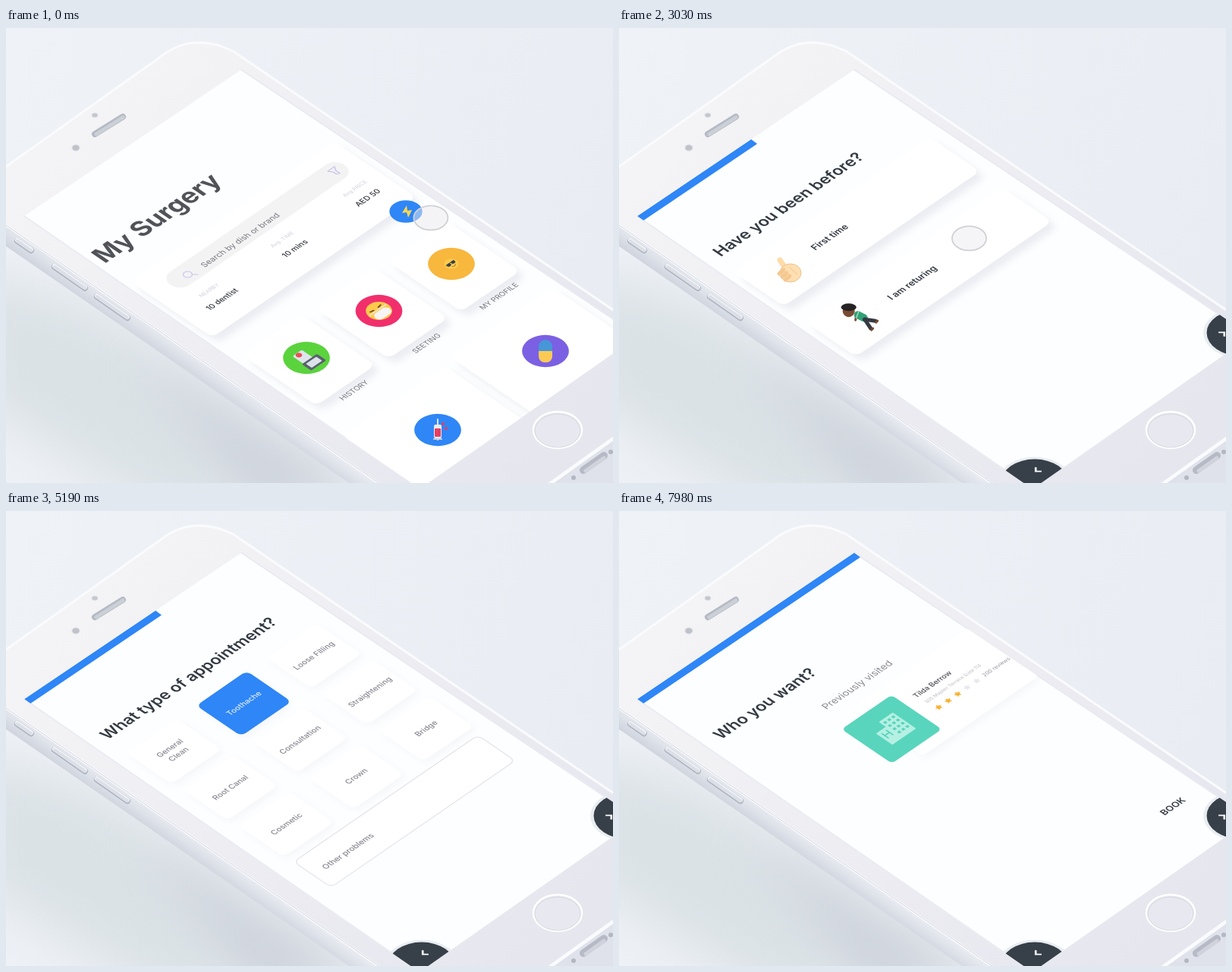
An HTML page with a canvas that plays this animation: 800x600 px, repeating every 8000 ms.

```html
<!DOCTYPE html>
<html lang="en">
<head>
<meta charset="utf-8">
<title>Dental booking</title>
<style>
html, body { margin: 0; width: 100%; height: 100%; overflow: hidden; background: #eceff5; }
canvas { display: block; width: 800px; height: 600px; }
</style>
</head>
<body>
<canvas id="stage" width="800" height="600"></canvas>
<script>
const LOOP = 8000, BLUE = '#2f86f6', INK = '#343a43', GRAY = '#85858f', GLASS = '#3b4048';
// Screen axes of the tilted phone: u runs up-right, v runs down-right.
const UX = .763, UY = -.525, VX = .77, VY = .525;
const SCREEN = [[24, 248], [310, 55], [833, 406], [545, 608]];
// Start of each page after the home page, and the progress bar it leads to
const STARTS = [500, 1900, 3400, 5200, 7320];
const PROGRESS = [0, .273, .525, .605, .735, 1];

const backdrop = new OffscreenCanvas(800, 600);
const main = document.getElementById('stage').getContext('2d');
let g = backdrop.getContext('2d'), shift = 0;

const clamp = x => Math.max(0, Math.min(1, x));
const ease = x => (x = clamp(x)) * x * (3 - 2 * x);
const along = (x, y, u, v) => [x + u * UX + v * VX, y + u * UY + v * VY];
const tilt = (x, y) => g.setTransform(UX, UY, VX, VY, ...along(x, y, shift, 0));
const flat = (x = 0, y = 0) => g.setTransform(1, 0, 0, 1, ...along(x, y, shift, 0));

function paint(fill, stroke, width = 1) {
  if (fill) { g.fillStyle = fill; g.fill(); }
  if (stroke) { g.strokeStyle = stroke; g.lineWidth = width; g.stroke(); }
}
function poly(points, fill, stroke, width) {
  g.beginPath();
  points.forEach(p => g.lineTo(...p));
  if (fill) g.closePath();
  paint(fill, stroke, width);
}
function oval(x, y, rx, ry, ...style) {
  g.beginPath();
  g.ellipse(x, y, rx, ry, 0, 0, 7);
  paint(...style);
}
const dot = (x, y, r, ...style) => oval(x, y, r, r, ...style);
function box(x, y, w, h, r, ...style) {
  g.beginPath();
  g.roundRect(x, y, w, h, r);
  paint(...style);
}
function line(x1, y1, x2, y2, color, width) {
  g.lineCap = 'round';
  poly([[x1, y1], [x2, y2]], null, color, width);
  g.lineCap = 'butt';
}
function text(str, x, y, size, color = GRAY, weight = 400, align = 'center') {
  tilt(x, y);
  g.font = `${weight} ${size}px Inter, sans-serif`;
  g.fillStyle = color;
  g.textAlign = align;
  g.textBaseline = align === 'center' ? 'middle' : 'alphabetic';
  g.fillText(str, 0, 0);
}
const title = str => text(str, 134, 302, 22.4, INK, 600, 'left');

// A raised card hung from its lower left corner.
function card(x, y, w, h, r = 10, depth = 1) {
  tilt(x, y);
  g.shadowColor = `rgba(115,115,150,${.12 * depth})`;
  g.shadowBlur = 10;
  g.shadowOffsetX = 8 * depth;
  g.shadowOffsetY = 7 * depth;
  box(0, -h, w, h, r, '#fff');
  g.shadowColor = 'transparent';
}

function drawBackdrop() {
  flat();
  let grad = g.createLinearGradient(0, 0, 800, 300);
  grad.addColorStop(0, '#eff2f7');
  grad.addColorStop(1, '#e9ecf2');
  g.fillStyle = grad;
  g.fillRect(0, 0, 800, 600);

  g.filter = 'blur(28px)';
  poly([[-40, 320], [120, 370], [470, 610], [200, 640], [-40, 490]], '#dbe2e6');
  poly([[170, 430], [470, 620], [330, 630]], '#ced3dc');
  g.filter = 'none';

  // Metal side, lit at its upper rim
  grad = g.createLinearGradient(24, 268, 7, 292);
  grad.addColorStop(0, '#eceef3');
  grad.addColorStop(.5, '#dee2e9');
  grad.addColorStop(1, '#cfd4de');
  poly([[-20, 225], [-20, 274], [455, 602], [800, 700], [800, 400]], grad);

  // Front face
  g.beginPath();
  g.moveTo(-20, 197);
  g.lineTo(205, 37);
  g.quadraticCurveTo(247, 5, 300, 31);
  g.lineTo(840, 399);
  g.lineTo(840, 512);
  g.lineTo(640, 655);
  g.lineTo(570, 655);
  g.lineTo(-20, 246);
  grad = g.createLinearGradient(150, 60, 720, 560);
  grad.addColorStop(0, '#f4f3f5');
  grad.addColorStop(1, '#e6e6ef');
  paint(grad, '#fafbfd', 3);
  line(-20, 246, 500, 606, '#d0d4de', 1);
  poly([[840, 513], [640, 656], [840, 656]], '#dfe2ea');
  line(840, 514, 640, 657, '#fafbfd', 3);
  line(761, 583, 788, 564, '#b6bac5', 10);
  line(764, 584, 788, 567, '#d0d3dc', 5);
  [[748, 593], [797, 559]].forEach(([x, y]) => dot(x, y, 3, '#b2b7c2'));

  for (const [x, half] of [[24, 9], [84, 20], [140, 20]]) {
    const y = 287 + .7 * (x - 24);
    const strip = (lift, color, width) =>
      line(x - half, y - .7 * half - lift, x + half, y + .7 * half - lift, color, width);
    strip(0, '#aeb5c3', 8);
    strip(1, '#f1f3f6', 6);
    strip(0, '#dcdfe6', 4);
  }
  oval(92, 158, 5, 4, '#bfc2ca', '#dcdde3');
  oval(117, 115, 4, 3, '#c3c6ce', '#dfe0e5');
  line(117, 140, 154, 117, '#b4bac4', 8);
  line(119, 140, 154, 118, '#cbd0d7', 5);
  oval(727, 530, 32, 24, '#e8e8f0', '#fff', 2.5);
  oval(727, 531, 30, 22, null, '#d6d7e0', 1);

  poly(SCREEN, '#fdfeff');
  line(...SCREEN[1], ...SCREEN[2], '#e9eaf2', 2);
  line(...SCREEN[0], ...SCREEN[3], '#ebecf3', 2);
}

function shades(x, y, r) {
  tilt(x, y);
  dot(0, 0, r, '#fdcb4c');
  g.scale(r / 15, r / 15);
  for (const side of [-1, 1]) box(side * 6 - 5, -5, 10, 8, 4, GLASS);
  line(-11, -4, 11, -4, GLASS, 2);
  g.beginPath();
  g.arc(0, 3, 6, .4, 2.5);
  paint(null, '#a8672a', 1.5);
}
function girl(x, y, r, child) {
  tilt(x, y);
  const hair = '#f9b52d';
  dot(0, 0, r, hair);
  if (!child) box(-r, 0, 2 * r, r + 1, 3, hair);
  oval(0, 3, r * .68, r * .75, '#ffdc8c');
  oval(-2, -r * .5, r * .7, r * .38, hair);
  for (const side of [-1, 1]) {
    if (child) dot(side * r, 7, 4, '#f5a02c');
    dot(side * 4.5, 2, 1.6, '#4b3b2c');
  }
  line(-3, 9, 3, 9, '#d8574f', 2);
}
function mask(x, y) {
  tilt(x, y);
  dot(0, 0, 16, '#fdca4c');
  box(-12, 0, 24, 13, 6, '#f7f5f5');
  line(-14, -2, 14, -2, '#eee', 1.5);
  for (const side of [-1, 1]) line(side * 9, -6, side * 4, -5, '#704b20', 2);
}
function hand(x, y) {
  flat(x, y);
  line(2, 6, -11, -13, '#ffdba8', 7);
  oval(3, 4, 14, 12, '#ffdfb2', '#eebf87', 1);
  for (let i = 0; i < 3; i++) line(4 * i - 12, 4 * i + 5, 4 * i - 6, 4 * i, '#f5c891', 5);
  line(1, -4, 12, 6, '#f3c58e', 1);
}
function walker(x, y) {
  flat(x, y);
  line(-3, -3, -4, 5, '#7a4b32', 3);
  line(-1, -2, 7, 2, '#31a176', 10);
  line(0, -6, -3, 2, '#a6d7c0', 1.5);
  for (const [fx, fy] of [[22, 6], [16, 16]]) {
    line(8, 4, fx, fy, '#353941', 5);
    line(fx + 1, fy + 2, fx + 3, fy, '#7a4b32', 3);
  }
  dot(-13, -7, 8, '#7a4b32');
  oval(-13, -12, 10, 5, '#252323');
}

function disc(x, y, color, r = 28.5) {
  tilt(x, y);
  dot(0, 0, r, color);
}
function clipboard(x, y) {
  tilt(x, y);
  box(-10, -14, 16, 24, 2, '#dfe5ec');
  box(-12, 4, 26, 16, 2, '#59616b');
  box(-8, 7, 18, 10, 1, '#dce2e9');
  dot(-3, -10, 4, '#ea4f55');
}
function pill(x, y) {
  flat(x, y);
  box(-9, -15, 18, 15, [9, 9, 0, 0], '#4796d8');
  box(-9, 0, 18, 15, [0, 0, 8, 8], '#fbca55');
}
function syringe(x, y) {
  flat(x, y);
  line(0, -14, 0, 13, '#dfe4ee', 2);
  box(-5, -7, 10, 18, 2, '#e9edf4');
  box(-4, -2, 8, 11, 1, '#e83d61');
  line(-5, 12, 5, 12, '#c9d1df', 2);
  for (const i of [0, 1]) dot(7 + 4 * i, -8 + 6 * i, 2, '#e83d61');
}

function home() {
  text('My Surgery', 130, 311, 36, '#505358', 700, 'left');
  card(272, 408, 352, 140);
  tilt(230, 330);
  box(-17, -17, 301, 33, 17, '#f4f3f4');
  tilt(241, 325);
  dot(-1, -1, 5.5, null, '#cbc8ea', 1.3);
  line(3, 3, 8, 8, '#cbc8ea', 1.3);
  tilt(433, 189);
  poly([[-6, -6], [6, -6], [2, 0], [2, 7], [-2, 5], [-2, 0], [-6, -6]], null, '#c4c0ea', 1.3);
  text('Search by dish or brand', 309, 280, 11.6, '#77777e');
  [['NEARBY', '10 dentist'], ['Avg. TIME', '10 mins'], ['Avg.PRICE', 'AED 50']].forEach(([label, value], i) => {
    const x = 268 + 96 * i, y = 346 - 67 * i;
    text(label, x, y, 7.8, '#cfcfdb');
    text(value, x + 17, y + 12, 11, '#33363d', 500);
  });
  disc(527, 242, BLUE, 20);
  flat(528, 242);
  poly([[0, -8], [-6, 2], [0, 1], [2, 8], [7, -2], [1, -1]], '#ffd84d');

  const tiles = [['HISTORY', '#5bd33d', clipboard], ['SEETING', '#f12f6d', mask],
    ['MY PROFILE', '#f8b73d', (x, y) => shades(x, y, 9)]];
  tiles.forEach(([label, color, icon], i) => {
    const x = 396 + 95.5 * i, y = 435 - 62 * i;
    card(x + 13, y + 63, 102, 127);
    disc(x, y, color);
    icon(x, y);
    text(label, x + 63, y + 43, 10.5, '#74757d');
  });
  [[BLUE, syringe], ['#7b60e3', pill]].forEach(([color, icon], i) => {
    const x = 569 + 142 * i, y = 530 - 104 * i;
    card(x - 14, y + 84, 176, 145);
    disc(x, y, color);
    icon(x, y);
  });
}

// Each part of a page springs sideways into its place, later parts with a delay.
function part(time, page, delay, draw) {
  const start = page ? STARTS[page - 1] : -LOOP, end = (STARTS[page] ?? LOOP) + 200;
  const t = (time - start) / 1000 - delay * .14;
  const alpha = clamp(t / .25) * clamp((end - time) / 200);
  if (!alpha) return;
  g.globalAlpha = alpha;
  shift = -160 * Math.exp(-5 * t) * Math.cos(7 * t);
  draw();
  shift = 0;
  g.globalAlpha = 1;
}

function choices(time, page, heading, items) {
  part(time, page, 0, () => title(heading));
  items.forEach(([label, x, y, icon], i) => part(time, page, i / 2, () => {
    card(217 + 95.5 * i, 367 + 66 * i, 339, 86);
    icon();
    text(label, x, y, 13, INK, 600);
  }));
}

const PROBLEMS = [
  ['General|Clean', 'Toothache', 'Loose Filling'],
  ['Root Canal', 'Consultation', 'Straightening'],
  ['Cosmetic', 'Crown', 'Bridge']];

function problems(time) {
  part(time, 3, 0, () => title('What type of appointment?'));
  PROBLEMS.forEach((row, r) => part(time, 3, r, () => row.forEach((label, c) => {
    const x = 222 + 74 * r + 92 * c, y = 317 + 48 * r - 63 * c;
    card(x - 4, y + 43, 87, 77, 8, .5);
    const picked = label === 'Toothache' && time > 4950;
    if (picked) box(0, -77, 87, 77, 8, BLUE);
    label.split('|').forEach((word, i, all) => {
      const drop = (i - (all.length - 1) / 2) * 15;
      text(word, ...along(x, y, 0, drop), 11, picked ? '#e4efff' : GRAY, 500);
    });
  })));
  part(time, 3, 3, () => {
    tilt(525, 396);
    box(-159, -32, 318, 64, 8, '#fff', '#e2e2e8', 1.3);
    text('Other problems', 451, 449, 11.4, GRAY, 500);
  });
}

function mouth(time) {
  part(time, 4, 0, () => title('Where it is?'));
  part(time, 4, 1, () => {
    const center = [457, 343], alpha = g.globalAlpha;
    card(535, 572, 345, 500);
    tilt(...center);
    g.setLineDash([3, 2]);
    line(0, -150, 0, 150, '#ececf0', 1);
    line(-95, 0, 145, 0, '#ececf0', 1);
    g.setLineDash([]);
    [['BACK', 0, 0], ['FRONT', 0, -1], ['FRONT', 0, 1], ['LEFT', 1, 0], ['RIGHT', -1, 0], ['TOP', -1, -.9], ['BOTTOM', 1, .9]]
      .forEach(([label, u, v]) => text(label, ...along(...center, 161 * u, 204 * v), 9.8, GRAY, 500));

    // Two arches of teeth, the lower one with small front teeth
    tilt(...center);
    g.setLineDash([4, 3]);
    for (const [side, count] of [[-1, 15], [1, 16]]) {
      for (let i = 0; i < count; i++) {
        const a = Math.PI * (i + .5) / count;
        const r = side < 0 ? 16.5 : 17 - 5 * Math.sin(a);
        const picked = side < 0 && i === 13 && time > 6520;
        g.globalAlpha = alpha * ease((time - STARTS[3] - 250 - 15 * i) / 200);
        dot(side * 110 * Math.cos(a), side * (8 + 170 * Math.sin(a)), r,
          picked ? BLUE : 'rgba(233,238,246,.85)', '#57a7f2', 1.1);
      }
    }
    g.setLineDash([]);
    g.globalAlpha = alpha;
  });
}

function star(x, y, color) {
  tilt(x, y);
  poly(Array.from({ length: 10 }, (_, i) => {
    const a = i * Math.PI / 5, r = i % 2 ? 2.6 : 5;
    return [r * Math.sin(a), -r * Math.cos(a)];
  }), color);
}

function clinic() {
  const teal = '#59d5bd', mint = '#b5f0e3';
  title('Who you want?');
  text('Previously visited', 314, 230, 14, '#8b8b93');
  card(400, 323, 200, 121, 4, .5);
  tilt(359, 288);
  box(-43, -43, 86, 86, 6, teal);
  box(-19, -8, 18, 28, 1, mint);
  box(-2, -20, 24, 40, 1, mint);
  for (let i = 0; i < 12; i++) box(1 + i % 3 * 7, -16 + (i / 3 | 0) * 8, 4, 4, 0, teal);
  for (const x of [-14, -6]) line(x, -3, x, 8, teal, 2);
  line(-14, 2, -6, 2, teal, 2);
  text('Tilda Berrow', 413, 229, 10.3, '#4a4c53', 500);
  text('305 Maplen Terrace Suite 114', 440, 228, 6.8, '#b9b9c1');
  for (let i = 0; i < 5; i++) star(421 + 12.5 * i, 259 - 8.7 * i, i < 3 ? '#f9b234' : '#e8e8ee');
  text('200 reviews', 497, 206, 7.8, '#96969e');
  text('BOOK', 730, 390, 13, INK, 600);
}

function chrome(time) {
  const progress = STARTS.reduce((sum, start, i) =>
    sum + (PROGRESS[i + 1] - PROGRESS[i]) * ease((time - start) / 500), 0);
  flat();
  if (progress) {
    const x = 24 + 286 * progress, y = 248 - 193 * progress;
    poly([[24, 248], [x, y], [x + 8, y + 6], [32, 254]], BLUE);
  }
  g.globalAlpha = ease((time - STARTS[0] + 100) / 300);
  for (const [x, y, side] of [[548, 599, -1], [819, 402, 1]]) {
    tilt(x, y);
    dot(0, 0, 45, '#e9edf1');
    dot(0, 0, 41, '#373f48');
    if (side < 0) tilt(x + 2, y - 15); else tilt(x - 22, y);
    poly([[-4 * side, -5], [side, 0], [-4 * side, 5]], null, '#fff', 2.4);
  }
  g.globalAlpha = 1;
}

// Start time and goal of each fingertip; all drift in from the right.
const TAPS = [[-200, 529, 255], [1000, 347, 270], [2600, 451, 279], [4480, 318, 256], [6000, 480, 272]];

function touch(time) {
  flat();
  for (const [start, x, y] of TAPS) {
    const t = (time - start) / 650, rest = 1 - ease(t);
    g.globalAlpha = clamp(5 * Math.min(t, 1 - t)) * (start === 4480 ? ease((time - 4450) / 150) : 1);
    oval(x + 40 * rest, y - 6 * rest, 22.5, 16, 'rgba(236,236,240,.5)', '#d0d1d6', 1.8);
  }
  g.globalAlpha = 1;
}

function render(time) {
  flat();
  g.drawImage(backdrop, 0, 0);
  g.save();
  g.beginPath();
  SCREEN.forEach(p => g.lineTo(...p));
  g.clip();
  part(time, 0, 0, home);
  choices(time, 1, 'Appointment for ?', [
    ['Myself', 267, 278, () => shades(214, 320, 15)],
    ['My wife', 372, 346, () => girl(313, 387, 16)],
    ['Children', 470, 410, () => girl(411, 456, 13, true)]]);
  choices(time, 2, 'Have you been before?', [
    ['First time', 278, 276, () => hand(223, 319)],
    ['I am returing', 387, 336, () => walker(316, 380)]]);
  problems(time);
  mouth(time);
  part(time, 5, 0, clinic);
  chrome(time);
  touch(time);
  g.restore();
}

drawBackdrop();
g = main;
function frame() {
  render(performance.now() % LOOP);
  requestAnimationFrame(frame);
}
frame();
</script>
</body>
</html>
```
